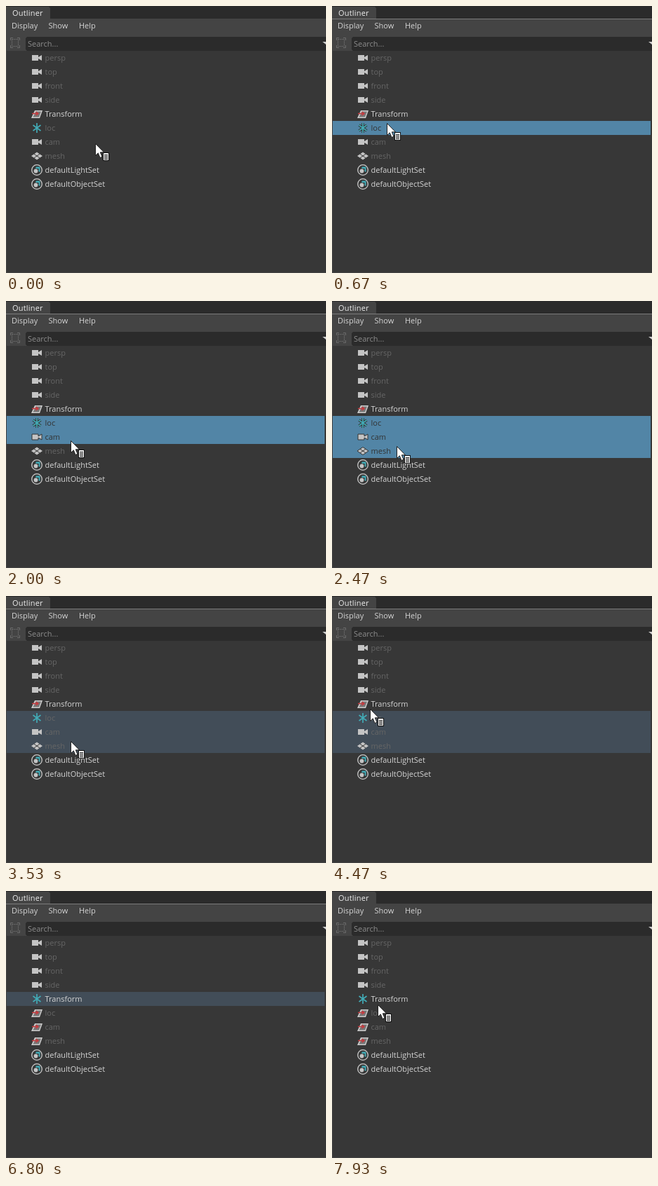
Write an HTML page that moves like this. It is 456 px wide and 381 px high and loops after 8000 ms.

```html
<!DOCTYPE html>
<html lang="en">
<head>
<meta charset="utf-8">
<title>Outliner</title>
<style>
  html, body { margin: 0; width: 100%; height: 100%; overflow: hidden; background: #373737; }
  svg { display: block; width: 456px; height: 381px; }
  text { font: 11px "Open Sans", "Noto Sans", sans-serif; fill: #d4d4d4; }
</style>
</head>
<body>
<svg viewBox="0 0 456 381">
  <rect width="456" height="381" fill="#444"/>
  <rect width="456" height="18" fill="#2b2b2b"/>
  <path d="M0 18V1H61L63 3V18Z" fill="#444"/>
  <path id="focus" d="M0 18.5H456" stroke="#7c7c7c"/>
  <rect x="1" y="64" width="455" height="316" fill="#373737"/>
  <path d="M456 44H30L28 46V62L30 64H456Z" fill="#2b2b2b"/>
  <path d="M451 51H456V55Z" fill="#ccc"/>
  <g fill="none" stroke="#6c6c6c">
    <path d="M6.5 49V45.500H10M16 45.500H19.500V49M19.500 56V59.500H16M10 59.500H6.500V56"/>
    <rect x="8.500" y="47.500" width="9" height="10" stroke-dasharray="2 1"/>
  </g>
  <text x="9" y="14" letter-spacing=".2" style="fill:#eee">Outliner</text>
  <text x="8" y="32">Display</text>
  <text x="60.500" y="32">Show</text>
  <text x="104" y="32">Help</text>
  <text x="31" y="58" style="fill:#8c8c8c">Search...</text>
  <g id="rows"></g>
  <g id="cursor">
    <path d="M.5 .5V17.500L4.300 13.800 7 20.500 10 19.200 7.300 12.800H12.500Z" fill="#fff" stroke="#222"/>
    <rect x="11.500" y="13.500" width="8" height="11" fill="#fff" stroke="#111"/>
    <path d="M13 16.500H18M13 18.500H18M13 20.500H18M13 22.500H18" stroke="#111"/>
  </g>
</svg>
<script>
// The timeline runs in ticks of 1/15 s.
const TICKS_PER_MS = 15 / 1000, LOOP = 120;
const CLICKS = [10, 28, 37], DIM = 53, PICK_PARENT = 72, SWAP = 102, CLEAR = 110;
const HIDE = 75, PARENT = 4, FIRST_SET = 8;

const names = ['persp', 'top', 'front', 'side', 'Transform', 'loc', 'cam', 'mesh',
  'defaultLightSet', 'defaultObjectSet'];

// Each icon is centred on its own origin.
const star = 'M0-7V7M-5.500-4L5.500 4M5.500-4L-5.500 4';
const icons = {
  camera: edge => `<path d="M-7-4H2V-1L7-4V4L2 1V4H-7Z" fill="#c4c4c4" stroke="${edge}"/>`,
  transform: () => `<path d="M-3-5H8L4 6H-8Z" fill="#ccc"/>
    <path d="M-1.500-3.500H6L3 4.500H-5.500Z" fill="#777"/>
    <path d="M-7-.5H1M-1.500-3L2-.5-1.500 2" stroke="#c8383c" stroke-width="1.500"/>`,
  locator: edge => `<path d="${star}" stroke="${edge}" stroke-width="3.500"/>
    <path d="${star}" stroke="#42aab5" stroke-width="1.700"/>`,
  mesh: edge => `<path d="M0-5.500L8 0 0 5.500-8 0Z" fill="#c4c4c4" stroke="${edge}"/>
    <path d="M-4-2.750L4 2.750M4-2.750L-4 2.750" stroke="#373737"/>`,
  set: () => `<circle r="7.300" stroke="#ccc" stroke-width="1.300"/>
    <path d="M-1.500-4.500H4.500V3L2.500 2V-2H-1.500Z" fill="#42aab5"/>
    <circle cx="-1.500" cy="1.500" r="2.900" fill="#c4c4c4"/>`
};
const group = ['transform', 'locator', 'camera', 'mesh'];

// Cursor glides; the cursor rests between them.
const home = [127, 196];
const glides = [
  { from: 1, to: 6, point: [78, 167] },
  { from: 16, to: 17, point: [82, 167] },
  { from: 20, to: 24, point: [92, 194] },
  { from: 28, to: 34, point: [92, 207] },
  { from: 59, to: 70, point: [47, 153] },
  { from: 72, to: 74, point: [55, 174] },
  { from: 110, to: 110, point: [80, 342] },
  { from: 111, to: 113, point: [61, 165] },
  { from: 117, to: 119, point: [65, 162] }
];

const smooth = p => p * p * (3 - 2 * p);
const $ = id => document.getElementById(id);

function iconOf(i, tick) {
  if (i < PARENT) return 'camera';
  if (i >= FIRST_SET) return 'set';
  if (tick < SWAP) return group[i - PARENT];
  return i === PARENT ? 'locator' : 'transform';
}

function selectionOf(i, tick) {
  if (i < PARENT || i >= FIRST_SET || tick >= CLEAR) return '';
  if (i === PARENT) return tick >= SWAP ? 'dim' : tick >= PICK_PARENT ? 'bright' : '';
  if (tick >= SWAP || tick < CLICKS[i - PARENT - 1]) return '';
  return tick < DIM ? 'bright' : 'dim';
}

function drawRow(name, i, tick) {
  const y = 64 + i * 20;
  const selection = selectionOf(i, tick);
  const bright = selection === 'bright';
  const shown = i === PARENT || i >= FIRST_SET;
  const color = bright ? (shown ? '#fff' : '#333') : shown ? '#d4d4d4' : '#666';
  const band = selection &&
    `<rect x="1" y="${y}" width="453" height="20" fill="${bright ? '#5285a6' : '#424d58'}"/>`;
  return `${band}<g transform="translate(44 ${y + 10})" fill="none">
    ${icons[iconOf(i, tick)](bright ? '#333' : 'none')}</g>
    <text x="55.500" y="${y + 14}" style="fill:${color}">${name}</text>`;
}

function cursorAt(tick) {
  return glides.filter(g => g.from <= tick).reduce((start, { from, to, point }) => {
    const p = smooth(Math.min(1, (tick - from + 1) / (to - from + 1)));
    return start.map((v, k) => Math.round(v + (point[k] - v) * p));
  }, home);
}

function render(tick) {
  $('rows').innerHTML = names.map((name, i) => drawRow(name, i, tick)).join('');
  $('focus').setAttribute('visibility', tick >= CLICKS[0] && tick < CLEAR ? 'visible' : 'hidden');
  $('cursor').setAttribute('transform', `translate(${cursorAt(tick)})`);
  $('cursor').setAttribute('visibility', tick >= HIDE && tick < CLEAR ? 'hidden' : 'visible');
}

const origin = performance.now();
let last = -1;
function play() {
  // The small offset absorbs rounding at tick boundaries.
  const tick = Math.floor((performance.now() - origin) * TICKS_PER_MS + 0.06) % LOOP;
  if (tick !== last) render(last = tick);
  requestAnimationFrame(play);
}
play();
</script>
</body>
</html>
```
